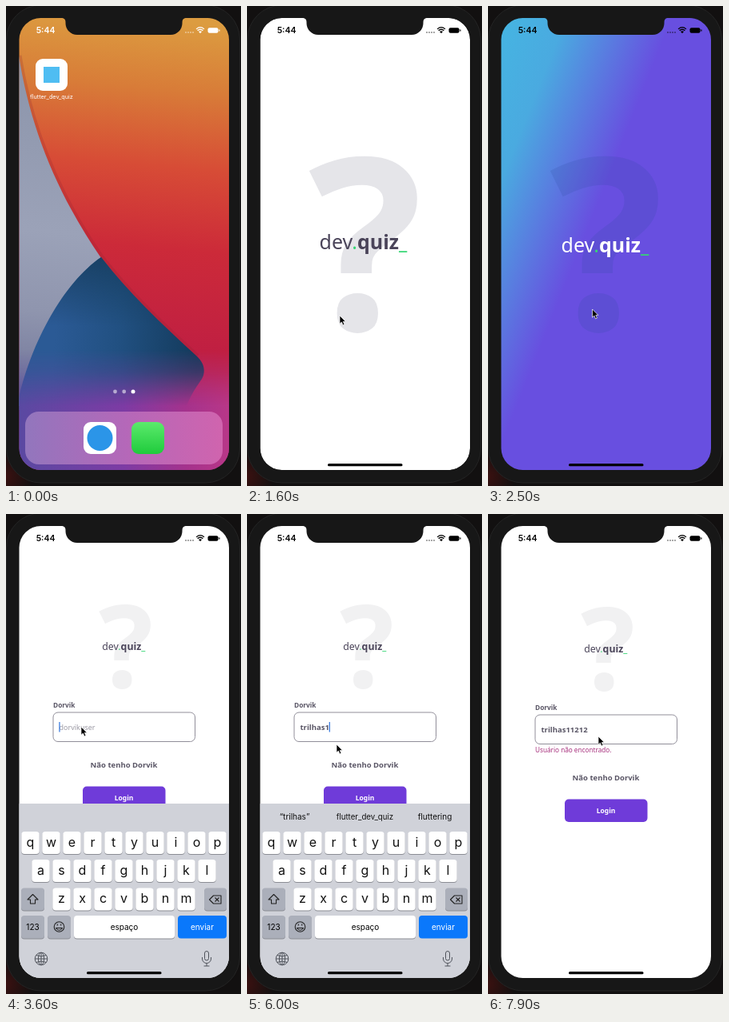
An HTML page that plays this animation: 294x600 px, repeating every 8000 ms.

```html
<!DOCTYPE html>
<html lang="pt">
<head>
<meta charset="utf-8">
<title>dev.quiz</title>
<style>
  html, body { margin: 0; width: 100%; height: 100%; overflow: hidden; background: #121212; }
  svg { display: block; width: 294px; height: 600px; font-family: "Noto Sans", sans-serif; }
  .ui { font-family: Inter, sans-serif; }
  .mid { text-anchor: middle; }
  .b { font-weight: 700; }
  .key { fill: #fff; filter: drop-shadow(0 1px 0 #8b8d94); }
  .dim { fill: #abafba; filter: drop-shadow(0 1px 0 #8b8d94); }
  .line { fill: none; stroke: #50545c; stroke-width: 1; }
</style>
</head>
<body>
<svg viewBox="0 0 294 600">
  <defs>
    <clipPath id="screen"><rect x="16.5" y="15" width="262.5" height="565" rx="27"/></clipPath>
    <clipPath id="zoom"><rect id="zoomBox"/></clipPath>
    <linearGradient id="warm" x1="160" y1="15" x2="110" y2="580" gradientUnits="userSpaceOnUse">
      <stop offset="0" stop-color="#dc9c40"/><stop offset=".15" stop-color="#d87c38"/>
      <stop offset=".32" stop-color="#d74c36"/><stop offset=".5" stop-color="#cc2a39"/>
      <stop offset=".72" stop-color="#c01f42"/><stop offset=".84" stop-color="#b3265e"/>
      <stop offset="1" stop-color="#b03a90"/>
    </linearGradient>
    <linearGradient id="haze" x1="60" y1="80" x2="16" y2="480" gradientUnits="userSpaceOnUse">
      <stop offset="0" stop-color="#8c95ab"/><stop offset=".5" stop-color="#9ba2b8"/>
      <stop offset=".75" stop-color="#8f95ae"/><stop offset="1" stop-color="#72769a"/>
    </linearGradient>
    <linearGradient id="petal" x1="60" y1="430" x2="240" y2="440" gradientUnits="userSpaceOnUse">
      <stop offset="0" stop-color="#2b5a95"/><stop offset=".45" stop-color="#215081"/><stop offset="1" stop-color="#133a5b"/>
    </linearGradient>
    <linearGradient id="shade" x1="0" y1="314" x2="0" y2="400" gradientUnits="userSpaceOnUse">
      <stop offset="0" stop-color="#153c5c" stop-opacity=".8"/><stop offset="1" stop-color="#153c5c" stop-opacity="0"/>
    </linearGradient>
    <linearGradient id="floor" x1="16" y1="0" x2="279" y2="0" gradientUnits="userSpaceOnUse">
      <stop offset="0" stop-color="#5a49a2"/><stop offset=".5" stop-color="#7d3ba4"/>
      <stop offset=".8" stop-color="#a5328c"/><stop offset="1" stop-color="#b83788"/>
    </linearGradient>
    <linearGradient id="rise" x1="0" y1="430" x2="0" y2="500" gradientUnits="userSpaceOnUse">
      <stop offset="0" stop-color="#000"/><stop offset=".4" stop-color="#444"/><stop offset="1" stop-color="#fff"/>
    </linearGradient>
    <mask id="fade"><rect x="16" y="420" width="264" height="162" fill="url(#rise)"/></mask>
    <linearGradient id="dock" x1="24" y1="0" x2="271" y2="0" gradientUnits="userSpaceOnUse">
      <stop offset="0" stop-color="#9276bd"/><stop offset=".5" stop-color="#b468b9"/><stop offset="1" stop-color="#d064ae"/>
    </linearGradient>
    <linearGradient id="cool" x1="16" y1="15" x2="201" y2="89" gradientUnits="userSpaceOnUse">
      <stop offset="0" stop-color="#45b5e2"/><stop offset=".38" stop-color="#4aaae0"/><stop offset="1" stop-color="#684fe0"/>
    </linearGradient>
    <linearGradient id="green" x1="0" y1="0" x2="0" y2="1">
      <stop offset="0" stop-color="#5bea6c"/><stop offset="1" stop-color="#1fcb3c"/>
    </linearGradient>
    <radialGradient id="glow" cx="0" cy="588" r="34" gradientUnits="userSpaceOnUse">
      <stop offset="0" stop-color="#3a1110"/><stop offset="1" stop-color="#121010"/>
    </radialGradient>
    <path id="leaf" d="M119 314C153 358 193 396 239 438C250 448 250 461 243 469C237 478 230 488 224 505H16V490C32 420 72 346 119 314Z"/>
  </defs>

  <rect width="294" height="600" fill="url(#glow)"/>
  <rect x=".5" y="-1" width="292" height="597" rx="43" fill="#171717" stroke="#242424"/>

  <g clip-path="url(#screen)">
    <g id="home">
      <rect x="16" y="15" width="264" height="566" fill="url(#warm)"/>
      <path fill="none" stroke="#8c2230" stroke-width="7" opacity=".22" d="M16 62C30 150 62 232 119 314C153 358 193 396 239 438"/>
      <path fill="url(#haze)" d="M16 62C30 150 62 232 119 315L60 500H16Z"/>
      <use href="#leaf" fill="url(#petal)"/>
      <use href="#leaf" fill="url(#shade)"/>
      <rect x="16" y="420" width="264" height="162" fill="url(#floor)" mask="url(#fade)"/>
      <rect x="37" y="66" width="40" height="40" rx="9" fill="#fff"/>
      <rect x="47" y="76" width="20" height="20" fill="#4fbdf2"/>
      <text class="ui mid" x="57" y="116" font-size="7.3" fill="#fff">flutter_dev_quiz</text>
      <g fill="#fff">
        <circle cx="136.500" cy="482" r="2.4" opacity=".55"/>
        <circle cx="147.700" cy="482" r="2.4" opacity=".55"/>
        <circle cx="159" cy="482" r="2.5"/>
      </g>
      <rect x="24" y="507" width="247" height="66" rx="17" fill="url(#dock)"/>
      <rect x="97" y="520" width="41" height="40" rx="9" fill="#fff"/>
      <circle cx="117.500" cy="540" r="16" fill="#2b95e8"/>
      <rect x="157" y="520" width="41" height="40" rx="9" fill="url(#green)"/>
    </g>

    <g id="splash" clip-path="url(#zoom)">
      <rect x="16" y="15" width="264" height="566" fill="#fff"/>
      <g id="splashArt">
        <text class="mid b" x="148.500" y="405" font-size="300" fill="#e5e5e9">?</text>
        <text x="90.500" y="304" font-size="25" fill="#4a4459">dev<tspan fill="#35d673">.</tspan><tspan class="b">quiz</tspan><tspan class="b" fill="#35d673">_</tspan></text>
      </g>
    </g>

    <g id="intro">
      <rect x="16" y="15" width="264" height="566" fill="url(#cool)"/>
      <text class="mid b" x="148.500" y="405" font-size="300" fill="#2b4a9c" opacity=".17">?</text>
      <text x="91.500" y="308" font-size="25" fill="#fff">dev<tspan fill="#35d673">.</tspan><tspan class="b">quiz</tspan><tspan class="b" fill="#35d673">_</tspan></text>
    </g>

    <g id="login">
      <rect x="16" y="15" width="264" height="566" fill="#fff"/>
      <g id="form">
        <text class="mid b" x="150" y="217" font-size="143" fill="#f1f1f2">?</text>
        <text x="120.300" y="169.500" font-size="12.300" fill="#4a4459">dev<tspan fill="#35d673">.</tspan><tspan class="b">quiz</tspan><tspan class="b" fill="#35d673">_</tspan></text>
        <text class="b" x="59" y="241.500" font-size="8.300" fill="#5a5666">Dorvik</text>
        <rect x="59" y="248" width="177.500" height="36.500" rx="6" fill="#fff" stroke="#918e99"/>
        <text id="hint" x="66.500" y="270" font-size="9" fill="#9c9aa5">dorvikuser</text>
        <text id="field" class="b" x="66.500" y="270" font-size="9.500" fill="#5a5666"></text>
        <rect id="caret" y="260" width="1.300" height="12.500" fill="#3f7fe0"/>
        <text id="error" x="59" y="295" font-size="8.200" fill="#a8327e">Usuário não encontrado.</text>
        <g id="actions">
          <text class="mid b" x="147.500" y="316.500" font-size="9.500" fill="#5a5666">Não tenho Dorvik</text>
          <rect x="96" y="340.500" width="103.500" height="28.500" rx="5" fill="#6f3bd9"/>
          <text class="mid b" x="147.500" y="358" font-size="8.500" fill="#fff">Login</text>
        </g>
      </g>
      <g id="keyboard" class="ui">
        <rect x="16" y="362" width="264" height="220" fill="#d0d2d9"/>
        <g id="tips" class="mid" font-size="10" fill="#111">
          <text id="typed" x="59.500" y="382"></text>
          <text x="147.500" y="382" font-size="9.700">flutter_dev_quiz</text>
          <text x="235" y="382">fluttering</text>
        </g>
        <g id="keys" class="mid" font-size="16" fill="#111"></g>
        <rect class="dim" x="19" y="467.500" width="29" height="28" rx="4"/>
        <rect class="dim" x="248" y="467.500" width="28" height="28" rx="4"/>
        <rect class="dim" x="19" y="502" width="29" height="28.500" rx="4"/>
        <rect class="dim" x="52" y="502" width="29" height="28.500" rx="4"/>
        <rect class="key" x="85" y="502" width="126" height="28.500" rx="4"/>
        <rect x="215" y="502" width="61" height="28.500" rx="4" fill="#0a78fb"/>
        <g class="mid" font-size="10">
          <text x="33.500" y="520">123</text>
          <text x="148" y="520">espaço</text>
          <text x="245.500" y="520" fill="#fff">enviar</text>
        </g>
        <g fill="none" stroke="#222" stroke-width="1.100" stroke-linejoin="round">
          <path d="M33.500 475.500L40 482H36.500V487H30.500V482H27Z"/>
          <path d="M259.500 477H269V487H259.500L254.500 482ZM261.500 479.500L266.500 484.500M266.500 479.500L261.500 484.500"/>
          <circle cx="66.500" cy="516" r="6.300"/>
          <path d="M62.500 517.500Q66.500 523 70.500 517.500Z"/>
          <path d="M64.300 512.500V514.500M68.700 512.500V514.500"/>
        </g>
        <g class="line">
          <circle cx="44" cy="556" r="7.800"/><ellipse cx="44" cy="556" rx="3.600" ry="7.800"/>
          <path d="M36.200 556H51.800M44 548.200V563.800M37.700 551.500Q44 554.500 50.300 551.500M37.700 560.500Q44 557.500 50.300 560.500"/>
          <rect x="248.500" y="546.500" width="5" height="11.500" rx="2.500"/>
          <path d="M245.500 554V556A5.500 5.500 0 0 0 256.500 556V554M251 561.500V565M247.500 565H254.500"/>
        </g>
      </g>
    </g>

    <rect id="bar" x="101" y="572" width="93.500" height="3.300" rx="1.600"/>
    <g id="status">
      <text class="ui" x="37.700" y="34.200" font-size="10.500" font-weight="600">5:44</text>
      <g opacity=".5"><circle cx="225" cy="33" r=".9"/><circle cx="228" cy="33" r=".9"/><circle cx="231" cy="33" r=".9"/><circle cx="234" cy="33" r=".9"/></g>
      <path d="M243 34.300L241 32.100Q243 30.600 245 32.100ZM240.100 31.200L239.100 30.100Q243 26.700 246.900 30.100L245.900 31.200Q243 28.700 240.100 31.200ZM238.400 29.300L237.600 28.400Q243 23.700 248.400 28.400L247.600 29.300Q243 25.300 238.400 29.300Z"/>
      <rect x="252.500" y="27.200" width="13" height="6.600" rx="2"/>
      <rect x="266.300" y="29.300" width="1.200" height="2.400" rx=".6"/>
    </g>
  </g>
  <path fill="#171717" d="M69 13V14.800Q74.500 15 74.500 20V21.500A14.500 14.500 0 0 0 89 36H206A14.500 14.500 0 0 0 220.500 21.500V20Q220.500 15 226 14.800V13Z"/>
  <path id="cursor" d="M0 0V10.200L2.400 8.100L4 11.900L5.900 11.100L4.300 7.400H7.400Z" fill="#000" stroke="#fff" stroke-width=".7"/>
</svg>

<script>
const LOOP = 8000;
const $ = id => document.getElementById(id);
const set = (id, attrs) => { for (const k in attrs) $(id).setAttribute(k, attrs[k]); };
const ease = p => p * p * (3 - 2 * p);
const show = (id, on) => { $(id).style.display = on ? "" : "none"; };

// rows: [time, value, value, ...]
function track(rows, t) {
  if (t <= rows[0][0]) return rows[0].slice(1);
  for (let i = 1; i < rows.length; i++) {
    const a = rows[i - 1], b = rows[i];
    if (t < b[0]) {
      const p = ease((t - a[0]) / (b[0] - a[0]));
      return a.slice(1).map((v, j) => v + (b[j + 1] - v) * p);
    }
  }
  return rows[rows.length - 1].slice(1);
}

const pointer = [
  [200, 92, 150], [600, 57, 90], [1000, 57, 90], [1550, 116, 387], [1800, 116, 387],
  [2450, 130.5, 379], [2800, 130.5, 379], [3250, 94, 266], [4000, 94, 266],
  [4800, 112, 288], [6500, 112, 288], [6900, 146, 350], [7150, 146, 350], [7700, 138, 278]
];
const opening = [[1000, 37, 66, 40, 40, 9], [1400, 16.5, 15, 262.5, 565, 27]];
const artFade = [[1120, 0], [1400, 1]];
const introFade = [[1950, 0], [2100, 1]];
const loginFade = [[2800, 0], [3050, 1]];
const keyboardY = [[3300, 220], [3570, 0], [7000, 0], [7280, 220]];
const formY = [[3300, 10], [3570, 0], [7000, 0], [7280, 10]];
const word = "trilhas11212";
const strokes = [4200, 4400, 4560, 4740, 4920, 5100, 5300, 5750, 6150, 6250, 6350, 6480];
const errorAt = 7500;

function keyRow(letters, x, y) {
  return [...letters].map((c, i) => {
    const cx = x + 26 * i;
    return `<rect class="key" x="${cx - 11.2}" y="${y}" width="22.4" height="28" rx="4"/>` +
           `<text x="${cx}" y="${y + 18.5}">${c}</text>`;
  }).join("");
}
$("keys").innerHTML = keyRow("qwertyuiop", 30.5, 397) + keyRow("asdfghjkl", 43.5, 432) + keyRow("zxcvbnm", 69.5, 467.5);

function draw(t) {
  const [x, y, width, height, rx] = track(opening, t);
  show("home", t < 1400);
  show("splash", t >= 1000 && t < 2100);
  set("zoomBox", { x, y, width, height, rx });
  set("splashArt", { opacity: track(artFade, t)[0] });

  show("intro", t >= 1950 && t < 3050);
  set("intro", { opacity: track(introFade, t)[0] });
  show("login", t >= 2800);
  set("login", { opacity: track(loginFade, t)[0] });

  const failed = t >= errorAt;
  const dy = failed ? 3 : track(formY, t)[0];
  set("form", { transform: `translate(0 ${dy})` });
  set("actions", { transform: `translate(0 ${failed ? 13 : 0})` });
  show("error", failed);

  const count = strokes.filter(s => s <= t).length;
  const text = word.slice(0, count);
  const last = count ? strokes[count - 1] : 3300;
  $("field").textContent = text;
  show("hint", !count);
  const lit = t - last < 500 || Math.floor(t / 500) % 2 === 1;
  show("caret", t >= 3300 && t < 7000 && lit);
  if (t >= 3300) set("caret", { x: 66.3 + (count ? $("field").getComputedTextLength() : 0) });

  set("keyboard", { transform: `translate(0 ${track(keyboardY, t)[0]})` });
  show("tips", count > 0);
  $("typed").textContent = "“" + text.slice(0, 7) + "”";

  const onHome = t < 1200;
  set("status", { fill: onHome ? "#fff" : "#000" });
  show("bar", !onHome);
  show("cursor", t >= 200);
  set("cursor", { transform: `translate(${track(pointer, t)})` });
}

let start;
function tick(now) {
  start ??= now;
  draw((now - start) % LOOP);
  requestAnimationFrame(tick);
}
draw(0);
requestAnimationFrame(tick);
</script>
</body>
</html>
```
